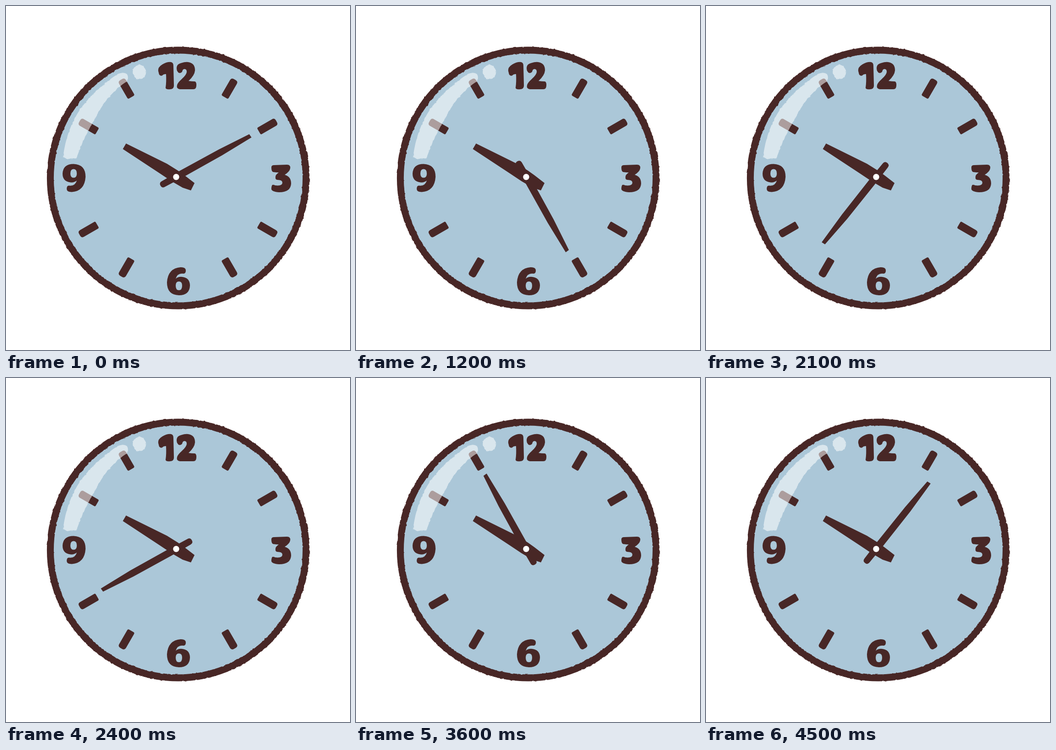
An HTML page for the animation above (4.8 s loop, 748 by 748 pixels).

```html
<!DOCTYPE html>
<html lang="en">
<head>
<meta charset="utf-8">
<title>Clock</title>
<style>
  html, body { margin: 0; width: 100%; height: 100%; overflow: hidden; background: #fff; }
  svg { display: block; width: 100%; height: 100%; }
</style>
</head>
<body>
<svg viewBox="0 0 748 748" fill="#482726">
  <defs>
    <!-- hand-drawn edges, from fine to coarse -->
    <filter id="soft" filterUnits="userSpaceOnUse" x="0" y="0" width="748" height="748" color-interpolation-filters="sRGB">
      <feTurbulence type="fractalNoise" baseFrequency=".16" seed="4"/>
      <feDisplacementMap in="SourceGraphic" scale="1.4" xChannelSelector="R" yChannelSelector="G"/>
    </filter>
    <filter id="rough" filterUnits="userSpaceOnUse" x="0" y="0" width="748" height="748" color-interpolation-filters="sRGB">
      <feTurbulence type="fractalNoise" baseFrequency=".17" seed="9"/>
      <feDisplacementMap in="SourceGraphic" scale="3.6" xChannelSelector="R" yChannelSelector="G"/>
    </filter>
    <path id="six" fill-rule="evenodd" d="M391 575Q391 582 386 582Q373 580 369 593Q375 588 383 589Q400 591 400 608Q399 629 376 629Q350 628 350 601Q352 570 380 568Q391 568 391 575Z
      M376 599Q369 599 369 608Q369 618 376 618Q383 618 383 608Q383 599 376 599Z"/>
  </defs>

  <circle cx="374.4" cy="374" r="278" fill="#abc7d8" stroke="#482726" stroke-width="15" filter="url(#rough)"/>

  <g filter="url(#soft)">
    <g id="ticks"></g>
    <g id="numerals">
      <path d="M331 141Q330 133 340 127Q350 121 359 122Q364 123 364 130L365 170Q366 181 357 181Q348 182 347 178Q349 165 348 148Q342 148 340 151Q336 153 333 149Z"/>
      <path d="M372 141Q368 127 381 124Q390 121 396 122Q411 124 411 140Q410 151 397 163Q404 164 410 164Q414 164 414 172Q414 182 406 181L378 181Q370 180 372 172Q373 167 382 159Q393 149 393 143Q393 137 388 137Q384 137 383 143Q380 147 375 145Z"/>
      <path d="M577 351Q577 346 583 346L611 345Q619 345 618 353Q617 360 606 367Q620 371 620 386Q619 405 594 405Q578 404 577 398Q577 392 579 389Q582 388 585 390Q601 392 601 384Q601 378 590 378Q585 378 586 371Q586 367 593 362Q587 362 581 361Q577 360 577 351Z"/>
      <use href="#six"/>
      <use href="#six" transform="rotate(180 261.5 486.25)"/>
    </g>
  </g>

  <g fill="#fff" opacity=".55" filter="url(#rough)">
    <path d="M124 329Q131 268 163 222Q195 180 241 149Q255 142 263 148Q267 154 264 163Q222 190 196 240Q168 288 153 331Q140 335 124 329Z"/>
    <ellipse cx="290" cy="143.5" rx="14.5" ry="15.5"/>
  </g>

  <g filter="url(#soft)">
    <path d="M261 299L350 343L374 358L388 368L410 385L402 401L384 395L360 381L333 363L254 311Z"/>
    <path id="minute" d="M-7 32Q-7 39 0 39Q7 39 7 32L7.8 -15L7.4 -110L4.2 -185L-4.2 -184L-7.4 -110L-7.8 -15Z"/>
    <circle cx="370" cy="371.7" r="6.7" fill="#fff"/>
  </g>
</svg>
<script>
  const STEP_MS = 300, STEPS = 16, START_ANGLE = 61;
  const minute = document.getElementById('minute');
  const ticks = document.getElementById('ticks');

  for (let hour = 1; hour < 12; hour++) {
    if (hour % 3 === 0) continue;
    const tick = document.createElementNS('http://www.w3.org/2000/svg', 'path');
    tick.setAttribute('d', 'M-8.5 -16Q-8.5 -22 -2.5 -22H2.5Q8.5 -22 8.5 -16V19Q8.5 22 5.5 22H-5.5Q-8.5 22 -8.5 19Z');
    tick.setAttribute('transform', `translate(374 374) rotate(${hour * 30}) translate(0 -225)`);
    ticks.append(tick);
  }

  function draw() {
    const step = Math.floor(performance.now() / STEP_MS) % STEPS;
    const angle = START_ANGLE + step * 360 / STEPS;
    minute.setAttribute('transform', `translate(370 371.7) rotate(${angle})`);
    requestAnimationFrame(draw);
  }
  draw();
</script>
</body>
</html>
```
